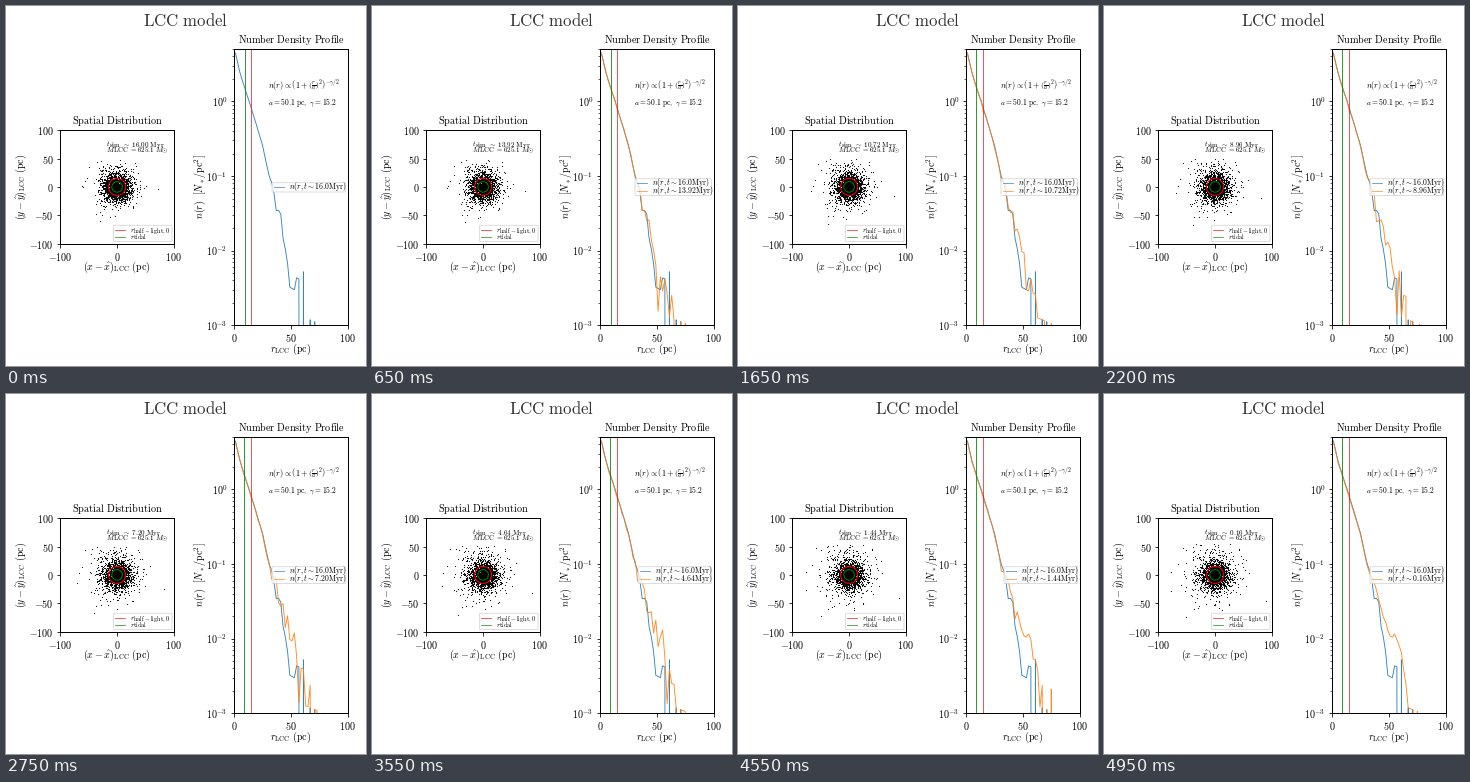
Animation, 360 px wide and 360 px high, one loop 5000 ms. Source, as a matplotlib script:

```python
import numpy as np
import matplotlib
import matplotlib.pyplot as plt
from matplotlib.animation import FuncAnimation
from matplotlib.patches import Circle, FancyBboxPatch

matplotlib.rcParams["mathtext.fontset"] = "cm"
matplotlib.rcParams["axes.linewidth"] = 1

SIZE = 360
FRAMES = 100
STEP = 0.16  # Myr per frame
STARS = 2000
RED, GREEN = "red", "green"
BLUE, ORANGE = "tab:blue", "tab:orange"

rng = np.random.default_rng(16)
edges = np.arange(0, 102, 2)
mids = edges[:-1] + 1

# Key points (radius in pc, log10 of the surface density)
CORE = [(0, 0.67), (5, 0.31), (15, -0.16), (25, -0.66), (31, -1.1)]
START = CORE + [(34, -1.18), (37, -1.55), (41, -1.53), (43, -1.94),
                (46, -2.05), (50, -2.8), (55, -2.36), (58, -2.6), (58.1, -6),
                (60, -6), (61, -1.27), (62, -6), (66, -6), (67, -3.2),
                (75, -3.6)]
END = CORE + [(37, -1.3), (45, -1.75), (50, -2), (56, -2), (61, -2.25),
              (66, -2.8), (72, -3.2), (110, -4.3)]


def quantile_radii(profile):
    """Radii that share the stars evenly under a density profile."""
    r_key, log_n = np.transpose(profile)
    r = np.linspace(0, r_key[-1], 8000)
    mass = np.cumsum(r * 10 ** np.interp(r, r_key, log_n))
    share = (np.arange(STARS) + 0.5) / STARS
    return np.interp(share, mass / mass[-1], r)


r_start, r_end = quantile_radii(START), quantile_radii(END)
theta = rng.uniform(0, 2 * np.pi, STARS)
spin = rng.normal(0, 0.3, STARS)
wobble = rng.normal(0, 0.03, STARS)


def radii_at(u):
    r = (1 - u) * r_start + u * r_end
    return r * (1 + wobble * np.sin(np.pi * u))


def density(u):
    counts = np.histogram(radii_at(u), edges)[0]
    return np.maximum(counts / (4 * np.pi * mids), 1e-30)


def positions(u):
    r, a = radii_at(u), theta + spin * u
    return np.column_stack([r * np.cos(a), r * np.sin(a)])


fig = plt.figure(figsize=(5, 5), dpi=72, facecolor="white")


def axes_px(left, top, right, bottom):
    return fig.add_axes([left / SIZE, 1 - bottom / SIZE,
                         (right - left) / SIZE, (bottom - top) / SIZE])


sky = axes_px(54.4, 124.2, 167.8, 237.6)
prof = axes_px(228.3, 43.2, 341.6, 319.4)
page = axes_px(0, 0, SIZE, SIZE)
page.set(xlim=(0, SIZE), ylim=(SIZE, 0))
page.axis("off")


def label(x, y, text, size=10, ha="left", va="baseline", **kw):
    return page.text(x, y, f"${text}$", fontsize=size, ha=ha, va=va, **kw)


def rm(text):
    return r"\mathrm{" + text.replace(" ", r"\ ") + "}"


def ticks(values):
    return dict(ticks=values, labels=[f"${v}$" for v in values], fontsize=10)


def frame_box(x0, y0, x1, y1):
    box = FancyBboxPatch((x0, y0), x1 - x0, y1 - y0, fc="white", ec="0.8",
                         lw=0.8, alpha=0.8,
                         boxstyle="round,pad=0,rounding_size=1")
    page.add_patch(box)
    return box


def handle(x, y, color):
    return page.plot([x, x + 10], [y, y], color=color, lw=0.8, alpha=0.8)[0]


# Titles and axis labels
label(180, 20, rm("LCC model"), 16.8, "center", color="0.2")
label(111.3, 117.7, rm("Spatial Distribution"), 10.25, "center")
label(285, 37, rm("Number Density Profile"), 10.2, "center")
unit = r"_{\mathrm{LCC}}\ \mathrm{(pc)}"
label(111.3, 264.3, r"(x-\hat{x})" + unit, 10, "center")
label(15, 181, r"(y-\hat{y})" + unit, 10, "center", "center", rotation=90)
label(284.5, 346, "r" + unit, 10, "center")
label(194, 181, r"n(r)\ \ [N_*/\mathrm{pc}^2]", 10, "center", "center",
      rotation=90)

# Star map
sky.set(xlim=(-100, 100), ylim=(-100, 100))
sky.set_xticks(**ticks([-100, 0, 100]))
sky.set_yticks(**ticks([-100, -50, 0, 50, 100]))
stars = sky.scatter(*positions(0).T, s=1.3, c="black", linewidths=0)
for radius, color in ((15, RED), (9.3, GREEN)):
    sky.add_patch(Circle((0, 0), radius, fill=False, ec=color, lw=1,
                         zorder=3))

label(100, 140.5, "t", 7)
label(102.8, 141.3, rm("sim"), 6.8)
clock = label(115.5, 140.5, "", 7)
label(100, 145.7, "M", 7)
label(106.8, 146.5, rm("LCC"), 6.8)
label(123.3, 145.7, "=", 7)
label(131, 145.7, "625.1", 7)
label(149, 145.7, "M", 7)
label(154.8, 146.5, r"\odot", 7)

frame_box(107.5, 219.3, 166, 235.6)
for y, color, name in ((224, RED, "half-light,0"), (231, GREEN, "tidal")):
    handle(109, y, color)
    label(124, y + 1.6, "r", 7)
    label(127.3, y + 2.2, rm(name), 6.2)

# Density profile
prof.set_yscale("log")
prof.set(xlim=(0, 100), ylim=(1e-3, 5))
prof.set_xticks(**ticks([0, 50, 100]))
prof.set_yticks([10.0 ** p for p in range(-3, 1)],
                [f"$10^{{{p}}}$" for p in range(-3, 1)], fontsize=10)
prof.tick_params(which="minor", labelleft=False)
prof.plot(mids, density(0), color=BLUE, lw=0.9, alpha=0.9)
now_line, = prof.plot(mids, density(0), color=ORANGE, lw=0.9, alpha=0.9)
tidal = prof.axvline(9.1, color=GREEN, lw=0.8)
prof.axvline(15, color=RED, lw=0.8, alpha=0.85)

label(262, 82.5, r"n(r)\propto\left(1+\left(\frac{r}{a}\right)^2\right)"
      r"^{-\gamma/2}", 8.1)
label(262, 98.8, r"a=50.1\ \mathrm{pc},\ \gamma=15.2", 7.6)

key_box = frame_box(265.5, 176.5, 339.5, 186)
key_rows = [(handle(0, 0, c), label(0, 0, "", 7.7)) for c in (BLUE, ORANGE)]


def draw_key(t, both):
    """Legend of the profile, fitted to one or two rows."""
    x0 = 263 if both and t >= 9.995 else 266
    top, bottom = (172.7, 189.5) if both else (176.7, 186)
    key_box.set_bounds(x0, top, 339.5 - x0, bottom - top)
    rows = ((177.3, "16.0"), (185, f"{t:.2f}"))
    for n, ((line, text), (y, value)) in enumerate(zip(key_rows, rows)):
        y = y if both else 181.2
        line.set_data([x0 + 2, x0 + 12], [y, y])
        text.set_position((x0 + 17, y + 2))
        text.set_text(rf"$n(r,t\sim {value}\mathrm{{Myr}})$")
        for part in (line, text):
            part.set_visible(both or n == 0)


def draw(i):
    u = i / (FRAMES - 1)
    t = 16 - STEP * i
    stars.set_offsets(positions(u))
    clock.set_text(rf"$\sim\ {t:.2f}\ \mathrm{{Myr}}$")
    now_line.set_ydata(density(u))
    now_line.set_visible(i > 0)
    tidal.set_xdata([9.1 - 0.5 * u] * 2)
    draw_key(t, i > 0)
    return [stars, clock, now_line, tidal]


anim = FuncAnimation(fig, draw, frames=FRAMES, interval=50, repeat=True,
                     repeat_delay=0, blit=False)
plt.show()
```
